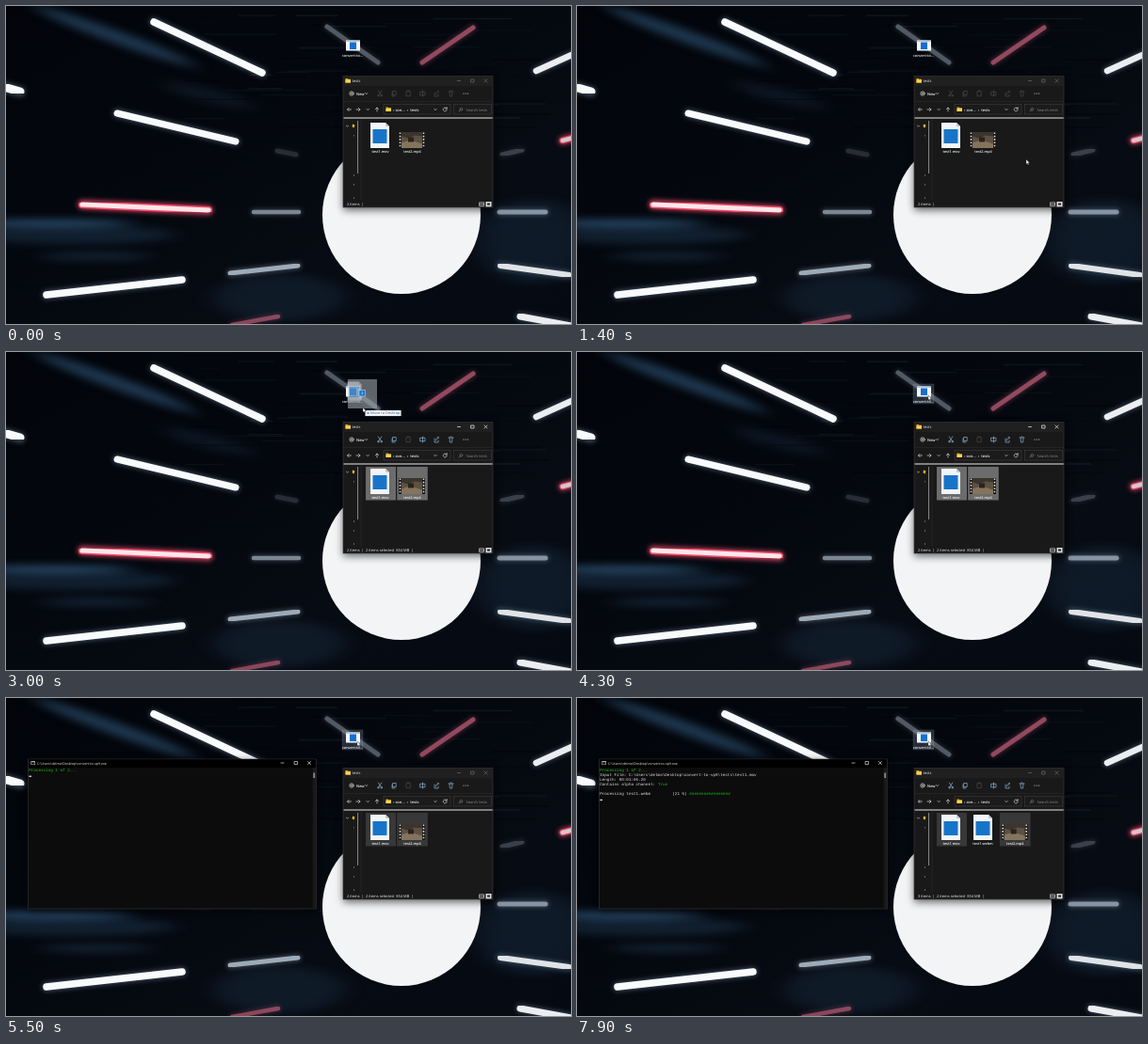
These frames come from a looping animation (600 px wide and 338 px high, 8 s). An HTML page:

```html
<!DOCTYPE html>
<html lang="en">
<head>
<meta charset="utf-8">
<title>Drag files to convert</title>
<style>
html, body { margin: 0; width: 100%; height: 100%; overflow: hidden; background: #04070c; }
svg { display: block; width: 100vw; height: 100vh; }
text { font-family: "Open Sans", "Noto Sans", sans-serif; font-size: 4px; fill: #f0f0f0; white-space: pre; text-rendering: geometricPrecision; }
.mono text { font-family: "Liberation Mono", "DejaVu Sans Mono", monospace; font-size: 4.283px; fill: #e2e2e2; }
.mono .ok { fill: #18c41c; }
.mid { text-anchor: middle; font-size: 3.8px; font-weight: 600; }
.line { fill: none; stroke: #d4d4d4; stroke-width: .7; stroke-linecap: round; stroke-linejoin: round; }
.tool { stroke: #4a4a4a; }
.active .tool { stroke: #8ab4d4; }
.active .paste { stroke: #4a4a4a; }
.caps { stroke: #6c6c6c; }
.focus .caps { stroke: #f2f2f2; }
.pick { fill: #383838; }
.focus .pick { fill: #6c6c6c; }
</style>
</head>
<body>
<svg viewBox="0 0 600 338" preserveAspectRatio="none" xmlns="http://www.w3.org/2000/svg">
  <defs>
    <linearGradient id="night" x2="1" y2="1">
      <stop offset="0" stop-color="#02040a"/>
      <stop offset=".4" stop-color="#04070e"/>
      <stop offset=".7" stop-color="#070b13"/>
      <stop offset="1" stop-color="#050a12"/>
    </linearGradient>
    <filter id="glow" x="-20%" y="-20%" width="140%" height="140%"><feGaussianBlur stdDeviation="2.6"/></filter>
    <filter id="soft" x="-20%" y="-20%" width="140%" height="140%"><feGaussianBlur stdDeviation=".6"/></filter>
    <filter id="haze" x="-50%" y="-150%" width="200%" height="400%"><feGaussianBlur stdDeviation="12 4"/></filter>
    <filter id="drop" x="-20%" y="-20%" width="140%" height="140%"><feGaussianBlur stdDeviation="4"/></filter>

    <g id="page">
      <path d="M-10-14H6L10-10V13H-10Z" fill="#f3f5f7"/>
      <path d="M6-14V-10H10Z" fill="#c3c9cf"/>
      <rect x="-7.5" y="-7" width="15" height="15" fill="#1874c8"/>
    </g>
    <g id="film">
      <rect x="-14" y="-8.5" width="28" height="17" fill="#161616"/>
      <rect x="-11" y="-8.5" width="22" height="17" fill="#5d5142"/>
      <path d="M-11-8.5H11V-4L3-5L-4-2L-11-4Z" fill="#3b352d"/>
      <path d="M-11 3L-2 0L11 4V8.5H-11Z" fill="#85745c"/>
      <rect x="-4" y="-3" width="6" height="5" fill="#28241f"/>
      <path d="M-12.5-8V8.5M12.5-8V8.5" stroke="#e2e2e2" stroke-width="1.5" stroke-dasharray="1.6 1.7"/>
    </g>
    <g id="folder">
      <path d="M0 .5H2.2L3 1.3H5.5V5H0Z" fill="#e3a21a"/>
      <rect y="1.9" width="5.5" height="3.1" fill="#ffd352"/>
    </g>
    <path id="caps" d="M-16 0h3M-1.5-1.5h3v3h-3zM12.5-1.5l3 3m0-3l-3 3"/>
  </defs>

  <rect width="600" height="338" fill="url(#night)"/>
  <g id="wall"></g>
  <g id="beams"></g>
  <circle cx="420" cy="222" r="84" fill="#f3f4f6"/>

  <g id="shortcut">
    <rect id="hover" x="357" y="34" width="22" height="21" fill="#8fa5b8" fill-opacity=".25" stroke="#8fa5b8" stroke-opacity=".3" stroke-width=".5"/>
    <rect x="361" y="36.5" width="15" height="11" fill="#f5f7f9"/>
    <rect x="361" y="36.5" width="15" height="1.5" fill="#b8c6d2"/>
    <rect x="365" y="38.5" width="7" height="7.5" fill="#1670cf"/>
    <text class="mid" x="368" y="53.5">convert-to...</text>
  </g>

  <g id="explorer">
    <rect x="358" y="76" width="160" height="141" fill="#000" opacity=".6" filter="url(#drop)"/>
    <rect x="358" y="74.5" width="159" height="139.5" fill="#191919" stroke="#3c3c3c" stroke-width=".6"/>
    <rect x="358.3" y="74.8" width="158.4" height="10.2" fill="#202020"/>
    <use href="#folder" x="360.5" y="76.5"/>
    <text x="367.5" y="81">tests</text>
    <use href="#caps" class="line caps" x="495.5" y="79.5"/>

    <g class="line">
      <circle cx="367" cy="93" r="2.2"/>
      <path d="M366 93h2M367 92v2M381.5 92.5l1.2 1.2 1.2-1.2"/>
      <g class="tool">
        <path d="M395.3 90l3 4.5M398.8 90l-3 4.5"/><circle cx="395.4" cy="95.2" r=".8"/><circle cx="398.7" cy="95.2" r=".8"/>
        <path d="M411 90.5h3.2v4h-3.2zM410 92v4h3"/>
        <path class="paste" d="M425.3 90.7h4v5h-4zM426.5 90h1.6"/>
        <path d="M440 91.3h5v3.5h-5zM442.5 90v6"/>
        <path d="M455 92v4h4v-2M456.5 94c0-2 1-3 3-3m-1-1l1 1-1 1"/>
        <path d="M470 91h5M471 91l.4 5h2.2l.4-5M472 90h1"/>
      </g>
      <path d="M486 93h0M488.3 93h0M490.6 93h0" stroke-width="1.2"/>
    </g>
    <text x="372" y="94.6" font-weight="600">New</text>
    <path d="M358 101.5H517" stroke="#2f2f2f" stroke-width=".5"/>

    <path class="line" d="M366.5 110h-4m1.6-1.6l-1.6 1.6 1.6 1.6M372 110h4m-1.6-1.6l1.6 1.6-1.6 1.6M383 109.5l1.2 1.2 1.2-1.2M394 112v-4m-1.6 1.6l1.6-1.6 1.6 1.6"/>
    <rect x="401" y="104.5" width="71" height="10.5" fill="#1b1b1b" stroke="#454545" stroke-width=".5"/>
    <rect x="475.5" y="104.5" width="40" height="10.5" fill="#1b1b1b" stroke="#454545" stroke-width=".5"/>
    <use href="#folder" x="403.5" y="107"/>
    <text x="411" y="111.5" font-weight="600">› con...  ›  tests</text>
    <path class="line" d="M454.8 109.5l1.2 1.2 1.2-1.2M468 109a2 2 0 1 0 .2 1.5M468.2 107.6v1.5h-1.5"/>
    <path class="line" stroke-opacity=".55" d="M481 112l1.3-1.3a1.4 1.4 0 1 1 .2.2"/>
    <text x="488.5" y="111.5" style="fill:#8c8c8c">Search tests</text>
    <path d="M358.5 119H516.7" stroke="#e8e8e8" stroke-width="1.2"/>

    <path class="line" d="M361.5 127.2l1 1 1-1"/>
    <path d="M368 125.5l2.5 1-1 3-1.8-1z" fill="#f0b72b"/>
    <path d="M369.5 137v1.5M369.5 179v2M369.5 189v2M369.5 203v2" stroke="#59636d" stroke-width="1"/>
    <path d="M373.6 122V178" stroke="#9b9b9b" stroke-width=".9"/>
    <path d="M377 120V206" stroke="#303030" stroke-width=".5"/>

    <g id="mov"><rect class="pick" x="382" y="122" width="32" height="35.5"/><use href="#page" x="397" y="138"/><text class="mid" x="397.5" y="155.8">test1.mov</text></g>
    <g id="webm"><use href="#page" x="431" y="138"/><text class="mid" x="431" y="155.8">test1.webm</text></g>
    <g id="mp4"><rect class="pick" x="415.2" y="122" width="32.6" height="35.5"/><use href="#film" x="431" y="142.5"/><text class="mid" x="431.5" y="155.8">test2.mp4</text></g>

    <text id="status" x="362" y="212.3"></text>
    <path class="line" d="M503 208.8h4.5v3.8h-4.5zM503 210.7h4.5"/>
    <rect x="509.5" y="208" width="6" height="5.3" fill="#dedede"/><rect x="511" y="209.4" width="3" height="2.3" fill="#333"/>
  </g>

  <g id="console">
    <rect x="24" y="67" width="305" height="159" fill="#000" opacity=".65" filter="url(#drop)"/>
    <rect x="23.7" y="65" width="305.6" height="159" fill="#0c0c0c" stroke="#3a3a3a" stroke-width=".6"/>
    <rect x="24" y="65.3" width="305" height="8.7" fill="#000"/>
    <rect x="26.5" y="67.2" width="4.5" height="3.8" fill="#d7d7d7"/><rect x="27" y="68.2" width="3.5" height="2.4" fill="#111"/>
    <text x="33" y="70.8" style="font-size:3.6px">C:\Users\delmo\Desktop\convert-to-vp9.exe</text>
    <use href="#caps" class="line" x="308" y="69"/>
    <rect x="325.7" y="74" width="3.3" height="149.6" fill="#191919"/>
    <rect x="326.3" y="79.5" width="1.8" height="5.5" fill="#8b8b8b"/>
    <g id="lines" class="mono"></g>
    <rect id="caret" x="24.4" width="2.6" height="1.2" fill="#eee"/>
  </g>

  <rect id="marquee" fill="#3489d8" fill-opacity=".3" stroke="#4fa2ea" stroke-width=".6"/>
  <g id="ghost">
    <rect x="-16" y="-30" width="31" height="31" fill="#a9b1b8" opacity=".55"/>
    <g opacity=".45"><use href="#page" transform="translate(-9 -17) scale(.75)"/></g>
    <rect x="-4" y="-18.5" width="6.5" height="6.5" fill="#1676cc" stroke="#fff" stroke-width=".4"/>
    <text class="mid" x="-.7" y="-13.7">2</text>
    <g id="tip">
      <rect x="2.5" y="3" width="38" height="6" fill="#fafafa" stroke="#8c8c8c" stroke-width=".3"/>
      <path d="M4 6h2.4m-1-1l1 1-1 1" fill="none" stroke="#1c64c4" stroke-width=".7"/>
      <text x="8" y="7.4" style="fill:#2860a8">Move to Desktop</text>
    </g>
  </g>
  <path id="mouse" d="M0 0V5.2L1.2 4.1 2 6 2.9 5.6 2.1 3.8H3.7Z" fill="#fff" stroke="#111" stroke-width=".35"/>
</svg>

<script>
const $ = id => document.getElementById(id);
const LOOP = 8000;

function add(parent, tag, attrs, text) {
  const el = document.createElementNS("http://www.w3.org/2000/svg", tag);
  for (const k in attrs) el.setAttribute(k, attrs[k]);
  if (text) el.textContent = text;
  return parent.appendChild(el);
}

// Wall: blurred blue patches (cx, cy, rx, ry, turn, opacity) and faint seams
const patches = [
  [45, 231, 90, 4, 0, .7], [70, 243, 110, 10, 0, .25], [95, 266, 60, 4, 0, .3],
  [115, 32, 90, 7, 20, .5], [215, 95, 50, 8, 14, .15], [560, 250, 60, 45, 0, .16], [290, 310, 70, 25, 0, .16]
];
for (const [cx, cy, rx, ry, turn, opacity] of patches)
  add($("wall"), "ellipse", { cx, cy, rx, ry, opacity, fill: "#39688f", filter: "url(#haze)", transform: `rotate(${turn} ${cx} ${cy})` });

let seed = 7;
const rnd = () => (seed = seed * 16807 % 2147483647) / 2147483647;
for (let i = 0; i < 60; i++) {
  const x = 190 + rnd() * 330, y = rnd() * 130;
  add($("wall"), "path", { d: `M${x} ${y}h${20 + rnd() * 70}`, stroke: i % 2 ? "#000" : "#26323e", "stroke-width": .6 + rnd(), opacity: .15 + rnd() * .25 });
}

// Light tubes: x1, y1, x2, y2, width, opacity, tint
const white = "#f8fafc", red = "#ee4a68", rose = "#c25f78", grey = "#aebccb";
const beams = [
  [157, 17, 272, 71, 7.5, 1, white], [-6, 85, 15, 91, 9, 1, white],
  [118, 114, 244, 144, 7, 1, white], [81, 211, 215, 217, 8, 1, red],
  [43, 307, 187, 291, 7.5, 1, white], [263, 219, 311, 219, 4.5, .7, grey],
  [238, 284, 310, 276, 5, .9, grey], [240, 339, 289, 330, 4.5, .7, rose],
  [341, 22, 395, 60, 5, .45, grey], [442, 60, 496, 23, 5, .75, rose],
  [563, 69, 605, 50, 6.5, .95, white], [527, 158, 548, 153, 5, .3, grey],
  [591, 143, 606, 139, 7, .85, red], [524, 219, 573, 219, 5, .75, grey],
  [525, 276, 598, 286, 6, .9, white], [546, 330, 606, 341, 7, .95, white],
  [288, 154, 308, 158, 5, .2, grey]
];
for (const [x1, y1, x2, y2, w, opacity, tint] of beams) {
  const d = `M${x1} ${y1}L${x2} ${y2}`;
  const g = add($("beams"), "g", { opacity, "stroke-linecap": "round" });
  // The empty box keeps the blur of flat tubes from being clipped
  const halo = add(g, "g", { filter: "url(#glow)" });
  add(halo, "rect", { x: Math.min(x1, x2) - 15, y: Math.min(y1, y2) - 15, width: Math.abs(x2 - x1) + 30, height: Math.abs(y2 - y1) + 30, fill: "none" });
  add(halo, "path", { d, stroke: tint === white ? "#8fabc6" : tint, "stroke-width": w + 2, opacity: tint === red ? .8 : .4 });
  add(g, "path", { d, stroke: tint, "stroke-width": w, filter: Math.abs(y2 - y1) > 4 ? "url(#soft)" : "none" });
  if (tint === red) add(g, "path", { d, stroke: "#ffe6ea", "stroke-width": w * .65 });
}

// Console output: row, column, text, time, class
const output = [
  [0, 0, "Processing 1 of 2...", 5000, "ok"],
  [1, 0, "Input File: C:\\Users\\delmo\\Desktop\\convert-to-vp9\\tests\\test1.mov", 5900, ""],
  [2, 0, "Length: 00:01:05.20", 5900, ""],
  [3, 0, "Contains alpha channel:", 6100, ""],
  [3, 24, "True", 6100, "ok"],
  [5, 0, "Processing test1.webm", 6500, ""],
  [5, 30, "(0 %)", 6500, ""],
  [5, 37, "", 6500, "ok"]
].map(([row, col, text, at, cls]) => ({
  row, at, el: add($("lines"), "text", { x: 24.2 + col * 2.57, y: 78 + row * 5.03, class: cls }, text)
}));
const [percent, bar] = output.slice(-2).map(o => o.el);

// Pointer path: time, x, y
const path = [
  [200, 606, 250], [900, 490, 172], [1300, 477, 163], [1600, 477, 163], [2000, 390, 130],
  [2180, 437, 146], [2400, 437, 146], [3000, 379, 59], [3500, 373, 46], [8000, 373, 46]
];
const ease = p => p * p * (3 - 2 * p);
function pointer(t) {
  const i = path.findIndex(k => k[0] > t);
  if (i < 1) return [path[0][1], path[0][2]];
  const [t0, x0, y0] = path[i - 1], [t1, x1, y1] = path[i];
  const p = ease((t - t0) / (t1 - t0));
  return [x0 + (x1 - x0) * p, y0 + (y1 - y0) * p];
}

const show = (id, on) => { $(id).style.display = on ? "" : "none"; };
const pick = (id, on) => { $(id).firstElementChild.style.display = on ? "" : "none"; };
const moveTo = (id, x, y) => $(id).setAttribute("transform", `translate(${x} ${y})`);
const within = (t, a, b) => t >= a && t < b;

function draw(t) {
  const [x, y] = pointer(t);
  moveTo("mouse", x, y);

  show("marquee", within(t, 1600, 2050));
  const box = { x, y, width: Math.max(0, 477 - x), height: Math.max(0, 163 - y) };
  for (const k in box) $("marquee").setAttribute(k, box[k]);

  show("ghost", within(t, 2450, 3900));
  show("tip", y < 74);
  moveTo("ghost", x, y);
  show("hover", t >= 3900);

  const chosen = t >= 1820, done = t >= 6500;
  $("explorer").setAttribute("class", (within(t, 1600, 4700) ? "focus " : "") + (chosen ? "active" : ""));
  pick("mp4", chosen);
  pick("mov", t >= 1920);
  show("webm", done);
  moveTo("mp4", done ? 33.7 : 0, 0);
  const count = t < 1920 ? "1 item selected  854 MB" : "2 items selected  854 MB";
  $("status").textContent = (done ? "3" : "2") + " items  |" + (chosen ? `  ${count}  |` : "");

  show("console", t >= 4700);
  const open = ease(Math.min(1, Math.max(0, (t - 4650) / 150)));
  const s = .92 + .08 * open;
  $("console").setAttribute("opacity", open);
  $("console").setAttribute("transform", `translate(${176 * (1 - s)} ${144 * (1 - s)}) scale(${s})`);

  let row = 0;
  for (const o of output) {
    const on = t >= o.at;
    o.el.style.display = on ? "" : "none";
    if (on) row = o.row + 1;
  }
  $("caret").setAttribute("y", 77.6 + row * 5.03);
  const pct = Math.max(0, Math.min(21, Math.floor((t - 6500) / 1380 * 21)));
  percent.textContent = `(${pct} %)`;
  bar.textContent = "#".repeat(Math.round(pct * .8));
}

const start = performance.now();
function tick() {
  draw((performance.now() - start) % LOOP);
  requestAnimationFrame(tick);
}
tick();
</script>
</body>
</html>
```
